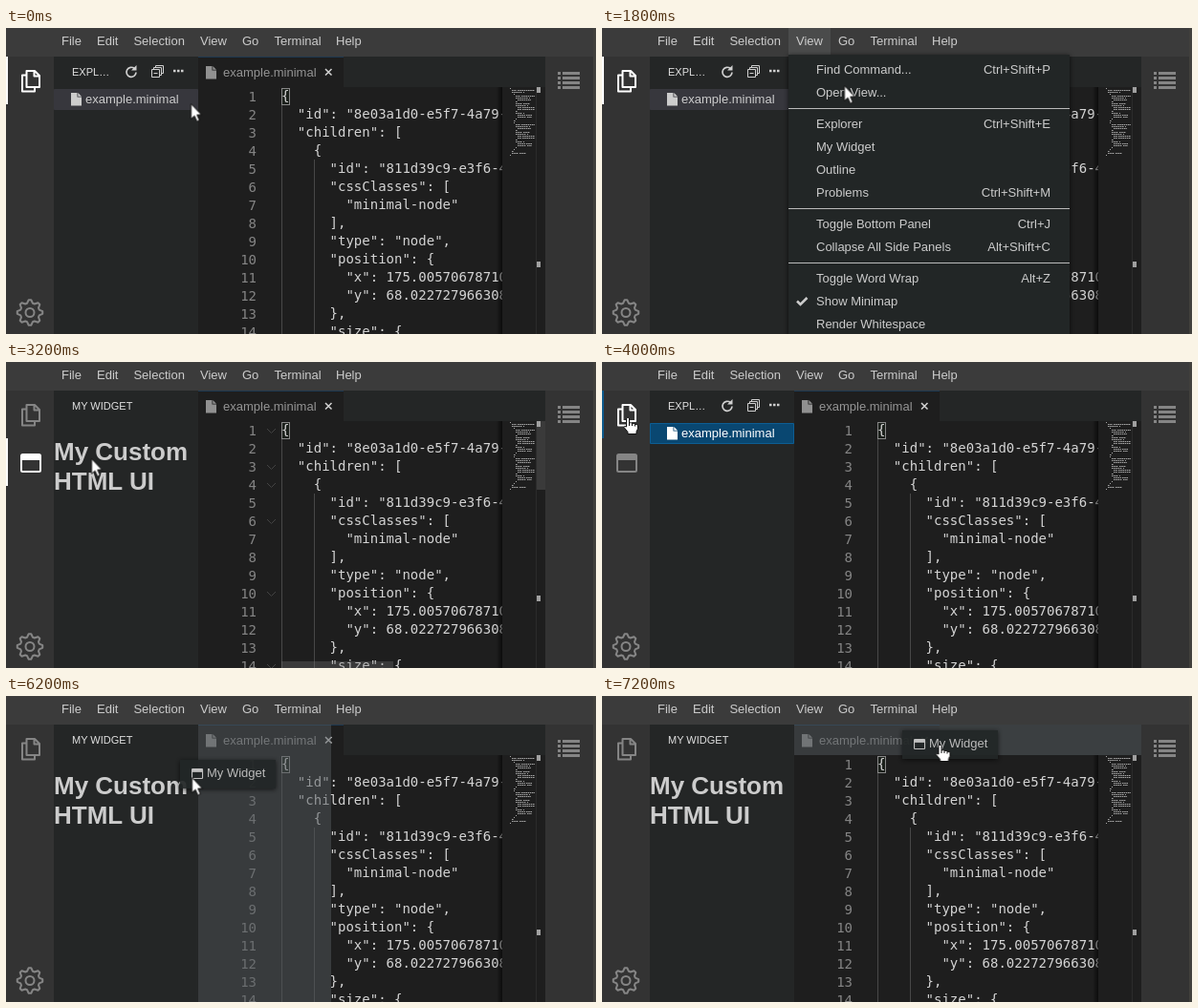
Animation of 617 by 321 pixels, one loop 8000 ms. Source, as an HTML page:

```html
<!DOCTYPE html>
<html lang="en">
<head>
<meta charset="utf-8">
<title>Custom widget in an editor</title>
<style>
html, body { margin: 0; width: 100%; height: 100%; overflow: hidden; background: #1e1e1e; }
svg { display: block; }
text { font: 13px "Liberation Sans", Arial, sans-serif; fill: #ccc; }
.small { font-size: 11px; fill: #e0e0e0; }
.title { font-size: 26px; font-weight: bold; }
#code text, #nums text { font: 14px "DejaVu Sans Mono", monospace; fill: #d4d4d4; }
#nums text { fill: #858585; text-anchor: end; }
.key { text-anchor: end; }
.line { fill: none; stroke: currentColor; }
#row text, #row use { stroke: none; }

.a { animation: 8s step-end infinite; }
#cursor { animation-name: cursor; }
#arrow { animation-name: arrow; }
#hand { animation-name: hand; }
#hover { animation-name: hover; }
#menu { animation-name: menu; }
#explorer { animation-name: explorer; }
#widget { animation-name: widget; }
#row { animation-name: row; }
#files { animation-name: files; }
#tab { animation-name: tab; }
#mark { animation-name: mark; }
#folds { animation-name: folds; }
#bars { animation-name: bars; }
#ghost { animation-name: ghost; }
#drop { animation-name: drop; }

@keyframes cursor {
  0% { transform: translate(193.5px, 79.5px); }
  2.5% { transform: translate(198px, 66px); }
  5% { transform: translate(208px, 42px); }
  7.5% { transform: translate(217px, 22px); }
  10% { transform: translate(220px, 17px); }
  22.5% { transform: translate(253.5px, 60.5px); }
  27.5% { transform: translate(255px, 86px); }
  30% { transform: translate(256px, 112px); }
  32.5% { transform: translate(256px, 122px); }
  35% { transform: translate(245px, 121px); }
  37.5% { transform: translate(160px, 112px); }
  40% { transform: translate(89.5px, 101.5px); }
  42.5% { transform: translate(66px, 84px); }
  45% { transform: translate(32px, 60px); }
  47.5% { transform: translate(27px, 55px); }
  50% { transform: translate(27px, 58px); }
  52.5% { transform: translate(28px, 72px); }
  55% { transform: translate(28px, 83.5px); }
  57.5% { transform: translate(21.5px, 86.5px); }
  62.5% { transform: translate(23px, 94.5px); }
  72.5% { transform: translate(25px, 97.5px); }
  77.5% { transform: translate(194.5px, 85.5px); }
  80% { transform: translate(256px, 71px); }
  82.5% { transform: translate(311.5px, 58px); }
  85% { transform: translate(336px, 54px); }
  87.5% { transform: translate(349px, 52px); }
  90%, to { transform: translate(353.5px, 51px); }
}
@keyframes arrow { 0%, 77.5% { visibility: visible; } 45%, 82.5%, to { visibility: hidden; } }
@keyframes hand { 0%, 77.5% { visibility: hidden; } 45%, 82.5%, to { visibility: visible; } }
@keyframes hover { 0%, 35%, to { visibility: hidden; } 7.5% { visibility: visible; } }
@keyframes menu { 0%, 35%, to { visibility: hidden; } 10% { visibility: visible; } }
@keyframes explorer { 0%, 47.5% { visibility: visible; } 35%, 67.5%, to { visibility: hidden; } }
@keyframes widget { 0%, 47.5% { visibility: hidden; } 35%, 67.5%, to { visibility: visible; } }
@keyframes row {
  0% { fill: #37373d; stroke: #37373d; color: #ccc; }
  47.5%, to { fill: #094771; stroke: #0d5d93; color: #fff; }
}
@keyframes files { 0%, 47.5% { color: #fff; } 35%, 67.5%, to { color: #858585; } }
@keyframes tab {
  0%, 77.5%, to { visibility: hidden; color: #fff; }
  35%, 52.5% { visibility: visible; color: #fff; }
  47.5% { visibility: visible; color: #858585; }
}
@keyframes mark {
  0% { transform: none; fill: #fff; visibility: visible; }
  35% { transform: translateY(50px); fill: #fff; visibility: visible; }
  47.5% { transform: none; fill: #0e5a8c; visibility: visible; }
  67.5% { transform: translateY(50px); fill: #fff; visibility: visible; }
  77.5%, to { visibility: hidden; }
}
@keyframes folds { 0%, 45%, 87.5%, to { visibility: hidden; } 32.5%, 82.5% { visibility: visible; } }
@keyframes bars { 0%, 42.5%, to { opacity: 0; } 35% { opacity: 1; } 40% { opacity: .8; } }
@keyframes ghost {
  0% { visibility: hidden; }
  77.5% { visibility: visible; transform: translate(182px, 67px); }
  80% { visibility: visible; transform: translate(234px, 53px); }
  82.5% { visibility: visible; transform: translate(279px, 41px); }
  85% { visibility: visible; transform: translate(300px, 38px); }
  87.5% { visibility: visible; transform: translate(311px, 36px); }
  90%, to { visibility: visible; transform: translate(314px, 36px); }
}
@keyframes drop {
  0% { visibility: hidden; }
  77.5% { visibility: visible; width: 139px; height: 291px; }
  80% { visibility: visible; width: 182px; height: 291px; }
  82.5% { visibility: visible; width: 363px; height: 107px; }
  85%, to { visibility: visible; width: 363px; height: 32px; }
}
</style>
</head>
<body>
<svg id="stage" width="617" height="321" viewBox="0 0 617 321">
  <defs>
    <clipPath id="codeClip"><path d="M201 62H519V321H201z"/></clipPath>
    <clipPath id="mapClip"><path d="M519 62H553V321H519z"/></clipPath>
    <linearGradient id="shade"><stop stop-color="#000" stop-opacity="0"/><stop offset="1" stop-color="#000" stop-opacity=".6"/></linearGradient>
    <filter id="shadow" x="-10%" y="-30%" width="120%" height="160%"><feDropShadow dx="0" dy="1" stdDeviation="2.5" flood-color="#000" flood-opacity=".7"/></filter>
    <path id="doc" d="M0 0H6.500V4.500H11V13.500H0zM7.300 0L11 3.700H7.300z" fill="currentColor"/>
    <g id="window"><rect x="1" y="1" width="20" height="18" rx="1.500" class="line" stroke-width="2"/><path d="M1 1H21V7H1z" fill="currentColor"/></g>
  </defs>

  <path d="M0 0H617V30H0z" fill="#3b3b3b"/>
  <path d="M0 30H50V321H0zM564 30H614V321H564z" fill="#333"/>
  <path d="M50 30H201V321H50zM353 30H564V62H353z" fill="#242626"/>
  <path d="M201 30H353V62H201zM201 62H564V321H201z" fill="#1e1e1e"/>
  <path d="M201 30H353V31H201z" fill="#1d3850"/>
  <path d="M614 0H617V321H614z" fill="#41403c"/>
  <path id="hover" class="a" d="M195 0H239V28H195z" fill="#4a4b4b"/>
  <g id="menubar"></g>

  <path id="mark" class="a" d="M0 30H2V80H0z"/>
  <g id="files" class="a line" stroke-width="2" stroke-linejoin="round">
    <path d="M21.500 45H30L35 50V62H21.500zM29.500 45V50.500H35"/>
    <path d="M21.500 49.500H17V66.500H30V62"/>
  </g>
  <g id="tab" class="a"><use href="#window" x="15" y="96"/></g>
  <g color="#858585" class="line" stroke-width="2"><path id="gear" stroke-linejoin="round"/><circle cx="25" cy="298.500" r="4.500"/></g>
  <path d="M577 47.500h3m2 0h18M577 52.500h3m2 0h18M577 57.500h3m2 0h18M577 62.500h3m2 0h18" stroke="#858585" stroke-width="3"/>

  <g id="explorer" class="a">
    <text class="small" x="69" y="50">EXPL…</text>
    <g color="#d0d0d0" class="line">
      <path d="M134.300 42.500A5 5 0 1 0 136 46.500" stroke-width="1.700"/>
      <path d="M136.500 39V44.500H131z" fill="currentColor" stroke="none"/>
      <path d="M152.500 43.500H160.500V51.500H152.500zM154.500 43V41.500H162.500V49.500H161M156.500 41V39.500H164.500V47.500H163M154.500 47.500H158.500"/>
      <path d="M175 45h2.500m1.500 0h2.500m1.500 0h2.500" stroke-width="2.500"/>
    </g>
    <g id="row" class="a">
      <path d="M50.500 64.500H200.500V85.500H50.500z"/>
      <use href="#doc" x="68" y="68"/>
      <text x="83" y="79" style="fill:currentColor">example.minimal</text>
    </g>
  </g>
  <g id="widget" class="a">
    <text class="small" x="69" y="50">MY WIDGET</text>
    <text class="title" x="50" y="103">My Custom</text>
    <text class="title" x="50" y="134">HTML UI</text>
  </g>

  <g color="#909090"><use href="#doc" x="209" y="40"/></g>
  <text x="227" y="51" style="fill:#959595">example.minimal</text>
  <path d="M334 43L340.500 49.500M340.500 43L334 49.500" stroke="#d4d4d4" stroke-width="1.500"/>

  <g clip-path="url(#codeClip)">
    <path d="M288.500 81V321M322.500 138V321" stroke="#484848"/>
    <rect x="288.500" y="63.500" width="8" height="17" fill="#1b201b" stroke="#888"/>
    <g id="nums"></g>
    <g id="code"></g>
    <path id="folds" class="a" fill="none" stroke="#434343"/>
  </g>
  <path d="M513 62H519V321H513z" fill="url(#shade)"/>
  <g clip-path="url(#mapClip)"><path id="map" stroke="#d4d4d4" stroke-dasharray="1.600 .6" opacity=".75"/></g>
  <path d="M554.500 62V321" stroke="#2b2b2b"/>
  <path id="bars" class="a" d="M288 314H405V321H288zM555 62H564V134H555z" fill="#797979" fill-opacity=".4"/>
  <path d="M555 62H559V68H555zM555 245H559V251H555z" fill="#a0a0a0"/>

  <g id="menu" class="a">
    <path d="M195 28H489V330H195z" fill="#242626" filter="url(#shadow)"/>
    <path d="M195 84.500H489M195 189.500H489M195 246.500H489" stroke="#bbb"/>
    <path d="M204 286.500L207.500 290L214.500 283" fill="none" stroke="#ccc" stroke-width="2.500"/>
    <g id="items"></g>
  </g>

  <rect id="drop" class="a" x="201" y="30" fill="#53595d" fill-opacity=".5"/>
  <g id="ghost" class="a" color="#c0c0c0">
    <path d="M0 0H100V30H0z" fill="#242626" opacity=".92" filter="url(#shadow)"/>
    <use href="#window" transform="translate(12 9) scale(.55)"/>
    <text x="28" y="18" style="fill:#bbb">My Widget</text>
  </g>
  <g id="cursor" class="a" stroke="#111" stroke-linejoin="round" fill="#fff">
    <path id="arrow" class="a" d="M0 0V16L3.600 12.700L6.200 18.500L8.800 17.300L6.300 11.700H11z"/>
    <path id="hand" class="a" d="M-1.500 1Q0 -1 1.500 1V6Q3.300 5 4.500 6.500Q6.300 5.700 7.500 7.200Q10.500 7 10.500 9V12L9 15V17.500H0V15.500L-4 10.500Q-4 8.500 -1.500 10zM1.500 6V9M4.500 6.500V9M7.500 7.200V9.500"/>
  </g>
</svg>
<script>
const $ = id => document.getElementById(id);
const put = (id, x, y, s, cls = "") => {
  const t = document.createElementNS("http://www.w3.org/2000/svg", "text");
  t.setAttribute("x", x);
  t.setAttribute("y", y);
  t.setAttribute("class", cls);
  t.textContent = s;
  $(id).append(t);
};

// Menus
[["File", 58], ["Edit", 95], ["Selection", 133.4], ["View", 203], ["Go", 247], ["Terminal", 280.5], ["Help", 345]]
  .forEach(([s, x]) => put("menubar", x, 18, s));
[
  [44, "Find Command...", "Ctrl+Shift+P"], [68, "Open View..."],
  [101, "Explorer", "Ctrl+Shift+E"], [125, "My Widget"], [149, "Outline"], [173, "Problems", "Ctrl+Shift+M"],
  [206, "Toggle Bottom Panel", "Ctrl+J"], [230, "Collapse All Side Panels", "Alt+Shift+C"],
  [263, "Toggle Word Wrap", "Alt+Z"], [287, "Show Minimap"], [311, "Render Whitespace"]
].forEach(([y, s, key]) => {
  put("items", 224, y + 4, s);
  if (key) put("items", 469, y + 4, key, "key");
});

// Document, shown as code and as minimap
const node = (id, x, y) => ({
  id, cssClasses: ["minimal-node"], type: "node",
  position: { x, y }, size: { width: 100.5, height: 50.25 }
});
const lines = JSON.stringify({
  id: "8e03a1d0-e5f7-4a79-9c11-52d0b7",
  children: [
    node("811d39c9-e3f6-4b02-a7d8-60c4e1", 175.0057067871094, 68.02272796630859),
    node("27b4f0e8-91ac-4d35-b6e2-13f9a5", 310.4412078857422, 142.6136322021484)
  ],
  type: "graph"
}, null, 2).split("\n");

let map = "", folds = "";
lines.forEach((s, i) => {
  for (const run of s.matchAll(/\S+/g)) map += `M${527 + run.index} ${63.5 + 2 * i}h${run[0].length}`;
  if (i > 13) return;
  const y = 76 + 19 * i, indent = s.search(/\S/);
  put("nums", 262, y + 1, i + 1);
  put("code", 288 + indent * 8.43, y, s.trim());
  if (/[{[]$/.test(s)) folds += `M273 ${y - 6}l4.500 4.500l4.500 -4.500`;
});
$("map").setAttribute("d", map);
$("folds").setAttribute("d", folds);

// Gear with eight teeth
const teeth = Array.from({ length: 32 }, (_, i) => {
  const a = (i + .5) * Math.PI / 16, r = i % 4 === 0 || i % 4 === 3 ? 13.3 : 10.2;
  return `${(25 + r * Math.cos(a)).toFixed(2)} ${(298.5 + r * Math.sin(a)).toFixed(2)}`;
});
$("gear").setAttribute("d", `M${teeth.join("L")}z`);
</script>
</body>
</html>
```
